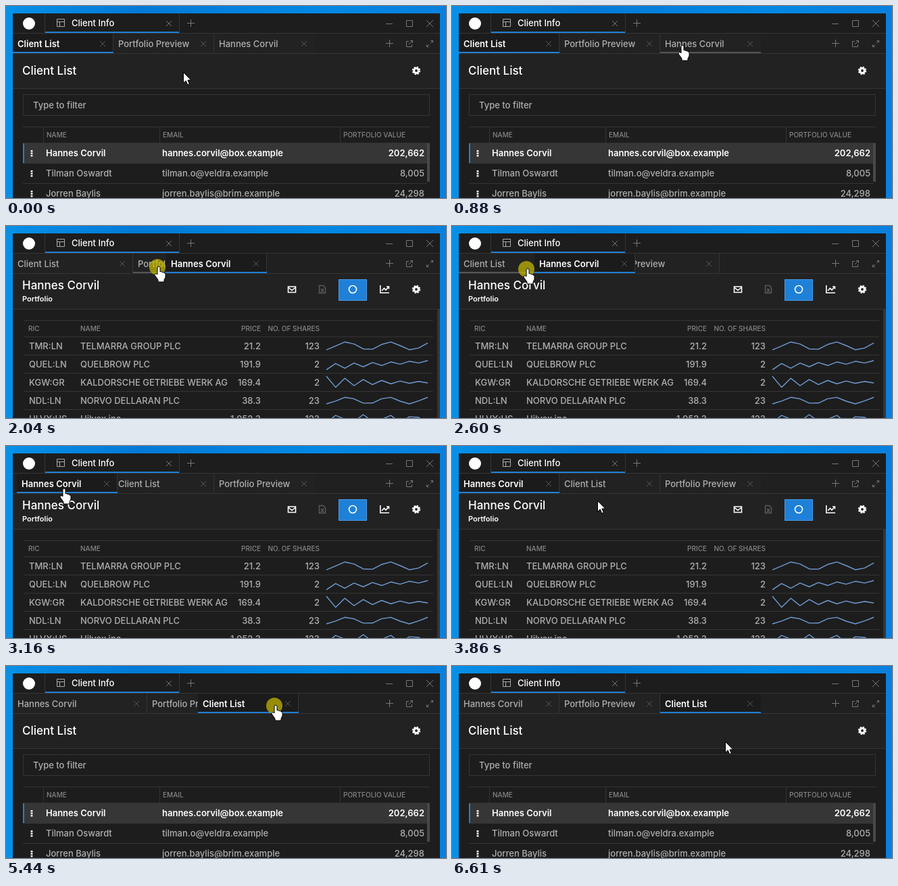
Animation, 651 px wide and 285 px high, one loop 7.74 s. Source, as an HTML page:

```html
<!DOCTYPE html>
<html lang="en">
<head>
<meta charset="utf-8">
<title>Tab reordering</title>
<style>
html, body { margin: 0; width: 100%; height: 100%; overflow: hidden; }
svg { display: block; width: 651px; height: 285px; }
text { font: 500 13px Inter, "Open Sans", sans-serif; fill: #b0b0b0; }
.white { fill: #fff; }
.bold { fill: #fff; font-weight: 600; }
.title { font-size: 17px; }
.sub { font-size: 11px; font-weight: 600; }
.head { font-size: 10px; fill: #868686; }
.end { text-anchor: end; }
.rule { stroke: #353535; fill: none; }
.thin { stroke: #777; fill: none; }
.dim { stroke: #555; fill: none; }
.icon { stroke: #fff; stroke-width: 1.6; fill: none; }
.spark { stroke: #6f9bd0; stroke-width: 1.4; fill: none; stroke-linejoin: round; }
.tab .back { fill: #222; }
.tab .bar { fill: none; }
.tab.hover .bar { fill: #555; }
.tab.active .back { fill: #1b1b1b; }
.tab.active .bar { fill: #1f80d8; }
.tab.active text { fill: #fff; font-weight: 600; }
.pointer { fill: #fff; stroke: #000; stroke-linejoin: round; }
</style>
</head>
<body>
<svg viewBox="0 0 651 285">
  <defs>
    <linearGradient id="sky">
      <stop offset="0" stop-color="#0890e8"/>
      <stop offset=".3" stop-color="#007ad6"/>
      <stop offset=".7" stop-color="#0088e4"/>
      <stop offset="1" stop-color="#0a80de"/>
    </linearGradient>
    <path id="x" d="M-4-4L4 4M4-4L-4 4"/>
    <path id="plus" d="M-5.5 0H5.5M0-5.5V5.5"/>
    <g id="gear" fill="none" stroke="#fff">
      <circle r="3.4" stroke-width="3"/>
      <circle r="5.2" stroke-width="2" stroke-dasharray="2.4 1.68"/>
    </g>
  </defs>

  <rect width="651" height="285" fill="url(#sky)"/>
  <rect x="10" y="11" width="632" height="274" fill="#1d1d1d"/>

  <!-- title bar -->
  <circle cx="34" cy="26" r="9" fill="#fff"/>
  <path class="rule" d="M57.5 11V40M256.5 11V40M10 40.5H642"/>
  <rect x="58" y="38" width="198" height="2" fill="#1f80d8"/>
  <path d="M75.5 19.5H86.5V30.5H75.5ZM75.5 23.5H86.5M79.5 23.5V30.5" fill="none" stroke="#aaa"/>
  <text class="white" x="97" y="30">Client Info</text>
  <g class="thin">
    <use href="#x" x="241" y="26"/>
    <use href="#plus" x="273.5" y="25.5"/>
    <path d="M562 26.5H572M592.5 21.5H601.5V30.5H592.5ZM622 21L632 31M632 21L622 31"/>
  </g>

  <!-- tab strip -->
  <rect x="10" y="41" width="632" height="30" fill="#202020"/>
  <path class="rule" d="M10 70.5H642"/>
  <g class="thin">
    <use href="#plus" x="567.5" y="55.5"/>
    <path d="M596 52.5H592.5V60.5H600.5V57M596 57L601.5 51.5M598 51.5H601.5V55M628 55L631.5 51.5M628.5 51.5H631.5V54.5M626 57L622.5 60.5M622.5 57.5V60.5H625.5"/>
  </g>
  <g id="tabs"></g>

  <!-- client list -->
  <g id="list">
    <rect x="10" y="71" width="632" height="51" fill="#222"/>
    <path class="rule" d="M10 122.5H642"/>
    <text class="white title" x="24" y="101.5">Client List</text>
    <use href="#gear" x="607" y="96"/>
    <rect class="rule" x="25.5" y="131.5" width="601" height="31"/>
    <text x="40" y="152">Type to filter</text>
    <path class="rule" d="M25 179.5H627M25 203.5H627M55.5 180V203M227.5 180V203M494.5 180V203"/>
    <text class="head" x="60" y="195">NAME</text>
    <text class="head" x="232" y="195">EMAIL</text>
    <text class="head" x="499" y="195">PORTFOLIO VALUE</text>
    <rect x="25" y="204" width="602" height="29" fill="#363636"/>
    <rect x="25" y="204" width="2" height="29" fill="#1f80d8"/>
    <path class="rule" d="M25 233.5H623M25 263.5H623"/>
    <rect x="623" y="204" width="4" height="57" fill="#484848"/>
  </g>

  <!-- portfolio -->
  <g id="holdings">
    <rect x="10" y="71" width="632" height="52" fill="#222"/>
    <path class="rule" d="M10 123.5H642"/>
    <text class="white title" x="24" y="93.5">Hannes Corvil</text>
    <text class="white sub" x="24" y="111.5">Portfolio</text>
    <path class="icon" d="M417.5 90H428.5V98.5H417.5ZM417.5 91L423 95.5L428.5 91"/>
    <path d="M463.5 88.5H469.5L472.5 91.5V99.5H463.5ZM466 93L470 98M470 93L466 98" fill="none" stroke="#5c5c5c" stroke-width="1.4"/>
    <rect x="492.5" y="79.5" width="41" height="31" fill="#1f80d8" stroke="#4a9be4"/>
    <circle class="icon" cx="513" cy="94" r="5.5"/>
    <path class="icon" d="M553.8 88V99.2H567M556 96L559.5 92.5L562 95L566 90.5M563 90H566.5V93.5"/>
    <use href="#gear" x="607" y="94"/>
    <text class="head" x="33" y="155.5">RIC</text>
    <text class="head" x="110" y="155.5">NAME</text>
    <text class="head end" x="377" y="155.5">PRICE</text>
    <text class="head end" x="464" y="155.5">NO. OF SHARES</text>
    <path class="rule" d="M26 140.5H632"/>
    <rect x="638" y="124" width="4" height="161" fill="#363636"/>
  </g>

  <g id="cursor">
    <circle id="press" cx="-2" r="12" fill="#c8ba00" opacity=".72"/>
    <path id="arrow" class="pointer" d="M.5.5V16.5L4.2 13L6.7 18.8L9.3 17.7L6.9 12H11.8Z"/>
    <path id="hand" class="pointer" d="M-2 1A2 2 0 0 1 2 1V7A1.8 1.8 0 0 1 5 8A1.8 1.8 0 0 1 8 9A1.6 1.6 0 0 1 10 11V15L8 19V22H-1V19L-6 12A2 2 0 0 1-3 10L-2 11Z"/>
  </g>
</svg>
<script>
const LOOP = 7740, STEP = 70, LEFT = 10, SLOT = 149;
const $ = id => document.getElementById(id);
const add = (id, html) => $(id).insertAdjacentHTML('beforeend', html);
const show = (id, on) => $(id).setAttribute('visibility', on ? 'visible' : 'hidden');

[
  ['Hannes Corvil', 'hannes.corvil@box.example', '202,662'],
  ['Tilman Oswardt', 'tilman.o@veldra.example', '8,005'],
  ['Jorren Baylis', 'jorren.baylis@brim.example', '24,298']
].forEach(([name, email, value], i) => {
  const y = 223 + i * 30, c = i ? '' : 'bold';
  add('list', `<path d="M38 ${y - 9}v9.4" stroke="#fff" stroke-width="2.8" stroke-dasharray="2.4 1.1"/>
    <text class="${c}" x="59" y="${y}">${name}</text>
    <text class="${c}" x="231" y="${y}">${email}</text>
    <text class="${c} end" x="619" y="${y}">${value}</text>`);
});

// tilted, fading cosine
const wave = (amp, freq, lag = 0, tilt = 0, fade = 1) =>
  k => tilt * (5.5 - k) + amp * Math.cos(freq * (k - lag)) * fade ** k;

[
  ['TMR:LN', 'TELMARRA GROUP PLC', '21.2', '123', wave(-6, 1.34, 2.2)],
  ['QUEL:LN', 'QUELBROW PLC', '191.9', '2', wave(4.5, Math.PI, 0, .7, .9)],
  ['KGW:GR', 'KALDORSCHE GETRIEBE WERK AG', '169.4', '2', wave(-9, Math.PI, 0, 0, .82)],
  ['NDL:LN', 'NORVO DELLARAN PLC', '38.3', '23', wave(5, 1.4)],
  ['HLVX:US', 'Hilvex inc', '1,052.3', '123', wave(-6, 2.3, 4)]
].forEach(([ric, name, price, shares, height], i) => {
  const mid = 178 + i * 27, y = mid + 4.5;
  const points = Array.from({ length: 12 }, (_, k) => `${474 + k * 13.64},${mid + height(k)}`).join(' ');
  add('holdings', `<path class="rule" d="M26 ${mid - 13.5}H632"/>
    <text x="34" y="${y}">${ric}</text><text x="110" y="${y}">${name}</text>
    <text class="end" x="377" y="${y}">${price}</text><text class="end" x="464" y="${y}">${shares}</text>
    <polyline class="spark" points="${points}"/>`);
});

const tabs = ['Client List', 'Portfolio Preview', 'Hannes Corvil'].map(name => {
  add('tabs', `<g class="tab"><rect class="back" y="41" height="29"/>
    <path class="rule" d="M-.5 41V70"/><text x="7" y="60.5">${name}</text>
    <use class="dim" href="#x" y="56"/><rect class="bar" y="68" height="2"/></g>`);
  const el = $('tabs').lastElementChild;
  return { el, edge: el.querySelector('path'), close: el.querySelector('use'), rects: el.querySelectorAll('rect') };
});

// stepped progress from 0 to 1; a power above 1 eases out
function progress(t, from, to, power = 1) {
  const u = Math.floor((t - from) / STEP) * STEP / (to - from);
  return 1 - (1 - Math.min(1, Math.max(0, u))) ** power;
}

const moves = [
  { from: 320, to: 1090, x: 371, y: 56 },
  { from: 1620, to: 3020, x: 86, y: 64, power: 2 },
  { from: 3300, to: 4140, x: 280, y: 83 },
  { from: 4140, to: 4420, x: 225, y: 56 },
  { from: 4810, to: 5440, x: 399, y: 59 },
  { from: 5790, to: 6420, x: 404, y: 112 }
];

// the vertical part settles sooner than the horizontal one
function pointer(t) {
  let x = 262, y = 98;
  for (const { from, to, power = 1, ...end } of moves) {
    x += (end.x - x) * progress(t, from, to, power);
    y += (end.y - y) * progress(t, from, to, power + 1);
  }
  return [x, y];
}

// [left, width] of each tab: idle tabs widen while another is carried
function layout(t) {
  const p = (...span) => progress(t, ...span);
  const swap = p(2740, 3160), lift = p(4810, 5160), drop = p(5790, 6000);
  const wide1 = 44 * (p(1760, 2180) - swap), wide2 = 50 * (lift - drop);
  return [
    [LEFT + SLOT * swap + 173 * p(4810, 5790, 1.25) - 24 * drop, SLOT + wide1],
    [LEFT + SLOT * (1 + swap - lift) + wide1 + wide2, SLOT + wide1 + wide2],
    [LEFT + SLOT * 2 - 286 * p(1690, 3090) - 12 * p(3090, 3230), SLOT + wide2]
  ];
}

function draw() {
  const t = performance.now() % LOOP;
  const [x, y] = pointer(t), boxes = layout(t);
  const holdings = t >= 1290 && t < 4680;
  const active = holdings ? 2 : 0;
  const under = ([left, w]) => y < 70 && x >= left && x < left + w;

  tabs.forEach((tab, i) => {
    const [left, w] = boxes[i].map(Math.round);
    tab.el.setAttribute('transform', `translate(${left})`);
    tab.rects.forEach(r => r.setAttribute('width', w));
    tab.edge.setAttribute('transform', `translate(${w})`);
    tab.edge.style.opacity = left + w < LEFT + SLOT * 3 ? 1 : 0;
    tab.close.setAttribute('x', w - 16);
    tab.el.classList.toggle('active', i === active);
    tab.el.classList.toggle('hover', i !== active && under(boxes[i]) && !under(boxes[active]));
  });
  const top = tabs[active].el;
  if ($('tabs').lastElementChild !== top) $('tabs').append(top);

  show('list', !holdings);
  show('holdings', holdings);
  show('press', t >= 1220 && t < 3090 || t >= 4610 && t < 5790);
  show('hand', y < 70);
  show('arrow', y >= 70);
  $('cursor').setAttribute('transform', `translate(${Math.round(x)} ${Math.round(y)})`);
  requestAnimationFrame(draw);
}
draw();
</script>
</body>
</html>
```
